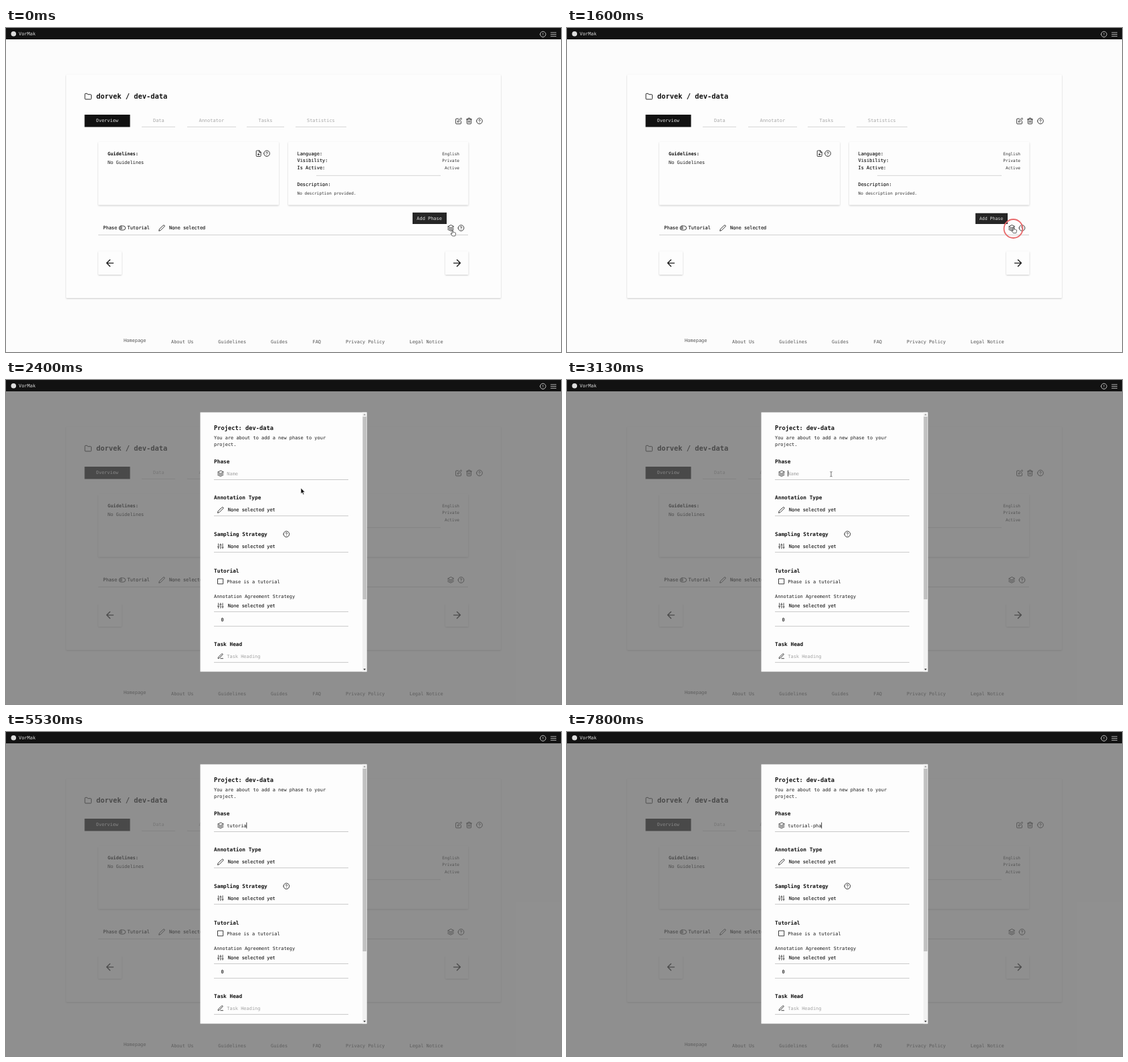
These frames come from a looping animation (830 px wide and 486 px high, 8000 ms). An HTML page:

```html
<!DOCTYPE html>
<html lang="en">
<head>
<meta charset="utf-8">
<title>Add phase</title>
<style>
html, body { margin: 0; width: 100%; height: 100%; overflow: hidden; background: #fcfcfc; }
svg { display: block; width: 830px; height: 486px; }
text { font-family: "DejaVu Sans Mono", "Liberation Mono", monospace; font-size: 6.94px; white-space: pre; }
.card { fill: #fdfdfd; filter: drop-shadow(0 1px 1px rgba(0, 0, 0, .2)); }
</style>
</head>
<body>
<svg id="stage" viewBox="0 0 830 486">
  <g id="page"></g>
  <g id="tip"></g>
  <g id="dialog"></g>
  <circle id="ring" fill="none" stroke="#e8696b" stroke-width="1.8"/>
  <g id="cursor">
    <path id="hand" fill="#fff" stroke="#222" stroke-width=".7" stroke-linejoin="round"
      d="M0 .8Q.8-.3 1.5.8V3.6L2.6 3.3 3.6 3.7 4.6 3.8 5.4 4.4V6.6L4.6 9H.6L-1.7 5.9Q-1.9 4.8-.8 5L0 5.8Z"/>
    <path id="arrow" fill="#111" stroke="#fff" stroke-width=".6" d="M0 0V8.6L2 6.8 3.4 10 4.8 9.4 3.4 6.3H6Z"/>
    <path id="beam" fill="none" stroke="#333" stroke-width=".7" d="M-1.6-3.6Q0-3.6 0-2.8 0-3.6 1.6-3.6M0-2.8V2.8M-1.6 3.6Q0 3.6 0 2.8 0 3.6 1.6 3.6"/>
  </g>
</svg>
<script>
const $ = id => document.getElementById(id);
const CIRCLE = 'M2 12a10 10 0 1 0 20 0a10 10 0 1 0-20 0';
const ICONS = {
  help: CIRCLE + 'M9.1 9a3 3 0 0 1 5.8 1c0 2-3 3-3 3M12 17h.01',
  info: CIRCLE + 'M12 8v4M12 16h.01',
  menu: 'M2 5h20M2 12h20M2 19h20',
  edit: 'M11 4H4a2 2 0 0 0-2 2v14a2 2 0 0 0 2 2h14a2 2 0 0 0 2-2v-7M18.5 2.5a2.1 2.1 0 0 1 3 3L12 15l-4 1 1-4z',
  trash: 'M3 6h18M19 6v14a2 2 0 0 1-2 2H7a2 2 0 0 1-2-2V6m3 0V4a2 2 0 0 1 2-2h4a2 2 0 0 1 2 2v2M10 11v6M14 11v6',
  layers: 'M12 2L2 7l10 5 10-5zM2 17l10 5 10-5M2 12l10 5 10-5',
  pencil: 'M17 3a2.8 2.8 0 1 1 4 4L7.5 20.5 2 22l1.5-5.5z',
  write: 'M12 20h9M16.5 3.5a2.1 2.1 0 0 1 3 3L7 19l-4 1 1-4z',
  sliders: 'M4 21v-7M4 10V3M12 21v-9M12 8V3M20 21v-5M20 12V3M1 14h6M9 8h6M17 16h6',
  folder: 'M22 19a2 2 0 0 1-2 2H4a2 2 0 0 1-2-2V5a2 2 0 0 1 2-2h5l2 3h9a2 2 0 0 1 2 2z',
  file: 'M14 2H6a2 2 0 0 0-2 2v16a2 2 0 0 0 2 2h12a2 2 0 0 0 2-2V8zM14 2v6h6M12 18v-6M9 15h6',
  left: 'M19 12H5M12 19l-7-7 7-7',
  right: 'M5 12h14M12 5l7 7-7 7',
  toggle: 'M8 5h8a7 7 0 0 1 0 14H8A7 7 0 0 1 8 5zM5 12a3 3 0 1 0 6 0a3 3 0 1 0-6 0',
  box: 'M3 3h18v18H3z'
};

const text = (x, y, s, fill = '#1c1c1c', more = '') => `<text x="${x}" y="${y}" fill="${fill}" ${more}>${s}</text>`;
const bold = (x, y, s, size = 6.94) => text(x, y, s, '#111', `font-weight="700" style="font-size:${size}px"`);
const small = (x, y, s, anchor = 'start') => text(x, y, s, '#333', `text-anchor="${anchor}" style="font-size:6.1px"`);
const medium = (x, y, s) => text(x, y, s, '#1c1c1c', 'stroke="#1c1c1c" stroke-width=".15"');
const rect = (x, y, w, h, fill, more = '') => `<rect x="${x}" y="${y}" width="${w}" height="${h}" fill="${fill}" ${more}/>`;
const card = (x, y, w, h) => rect(x, y, w, h, '#fdfdfd', 'class="card" rx="1"');
const rule = (x1, x2, y, color = '#cfcfcf') => `<path d="M${x1} ${y}H${x2}" stroke="${color}"/>`;
const icon = (name, x, y, size = 10.4, color = '#1c1c1c') =>
  `<path d="${ICONS[name]}" transform="translate(${x - size / 2} ${y - size / 2}) scale(${size / 24})"
    fill="none" stroke="${color}" stroke-width="2" stroke-linecap="round" stroke-linejoin="round"/>`;

const tabs = [[220, 'Data', 203, 253], [288.5, 'Annotator', 271, 344], [377.5, 'Tasks', 360, 416], [450, 'Statistics', 433, 509]];
const facts = [['Language:', 'English'], ['Visibility:', 'Private'], ['Is Active:', 'Active']];
const links = [[247, 'About Us'], [317.3, 'Guidelines'], [396, 'Guides'], [458.5, 'FAQ'], [508, 'Privacy Policy'], [603.5, 'Legal Notice']];

$('page').innerHTML = [
  rect(0, 0, 830, 486, '#fcfcfc'),
  card(90, 70, 650, 335),
  icon('folder', 122.8, 102.6, 11.5), bold(135, 106, 'dorvek / dev-data', 10.4),
  rect(117.5, 130, 68, 18.5, '#111'), text(134.6, 141.3, 'Overview', '#ddd'),
  ...tabs.map(([x, s, a, b]) => text(x, 141.3, s, '#a8a8a8') + rule(a, b, 148.3, '#d4d4d4')),
  icon('edit', 677, 139.5), icon('trash', 692.5, 139.5), icon('help', 708, 139.5),
  card(138, 171, 270, 94.5), card(422, 171, 269.5, 94.5),
  bold(152, 190.6, 'Guidelines:'), text(152, 204.4, 'No Guidelines'),
  icon('file', 377.7, 188.2), icon('help', 390, 188.2),
  ...facts.map(([k, v], i) => medium(435.5, 190.7 + i * 10.4, k) + small(678, 190.7 + i * 10.4, v, 'end')),
  rule(464, 650, 221.3, '#d4d4d4'),
  medium(435.5, 236.5, 'Description:'), small(435.5, 249.5, 'No description provided.'),
  medium(145.3, 302.4, 'Phase'), icon('toggle', 173.8, 300), medium(181.5, 302.4, 'Tutorial'),
  icon('pencil', 233, 300), medium(244, 302.4, 'None selected'),
  icon('layers', 665, 300), icon('help', 680.5, 300), rule(138, 691, 310.4),
  card(138, 335, 35, 35), card(657, 335, 34.5, 35),
  icon('left', 155.5, 352.6, 17), icon('right', 674.5, 352.6, 17),
  text(176, 471, 'Homepage', '#555'),
  ...links.map(([x, s]) => text(x, 472.6, s, '#555'))
].join('');

$('tip').innerHTML = rect(608, 276.8, 51, 17.2, '#262626') + text(614.3, 287.7, 'Add Phase', '#ddd');

const header = [
  rect(0, 0, 830, 17, '#121212'),
  '<circle cx="11.3" cy="8.8" r="3.8" fill="#ddd"/>',
  text(19, 11.2, 'VorMak', '#ddd'),
  icon('info', 803, 9.4, 10, '#ddd'), icon('menu', 818.7, 9.6, 9.4, '#ddd')
].join('');
$('tip').insertAdjacentHTML('beforebegin', `<g>${header}</g>`);

$('dialog').innerHTML = [
  rect(0, 17, 830, 469, 'rgba(98,98,98,.7)'),
  rect(290.5, 48.5, 249, 389, '#fdfdfd'),
  rect(533, 48.5, 6.5, 389, '#f1f1f1'), rect(533.5, 55, 5.5, 274, '#c1c1c1'),
  '<path d="M534.4 53L536.2 50.6 538 53z" fill="#a3a3a3"/><path d="M534.4 433L536.2 435.4 538 433z" fill="#444"/>',
  bold(311, 75, 'Project: dev-data', 8.7),
  text(311, 89, 'You are about to add a new phase to your'), text(311, 99.4, 'project.'),
  ...[[125, 'Phase'], [179.4, 'Annotation Type'], [234, 'Sampling Strategy'], [288.5, 'Tutorial'], [399.3, 'Task Head']]
    .map(([y, s]) => bold(311, y, s, 7.8)),
  ...[149.5, 203.8, 258.3, 347.6, 369.3, 423.6].map(y => rule(311, 512, y, '#c8c8c8')),
  icon('layers', 320.8, 140.3, 10), icon('pencil', 320.8, 195), icon('help', 419.3, 231.2),
  icon('sliders', 320.8, 249.3, 9.6), icon('box', 320.8, 302), icon('sliders', 320.8, 338.4, 9.6),
  icon('write', 320.8, 414.4, 10),
  ...[197.3, 251.8, 340.9].map(y => medium(331.8, y, 'None selected yet')),
  text(330.3, 304.5, 'Phase is a tutorial'), text(311, 327, 'Annotation Agreement Strategy'),
  medium(321.5, 362.4, '0'), text(330.3, 417, 'Task Heading', '#a3a3a3'),
  text(330.3, 142.8, '', '#1c1c1c', 'id="field"'),
  rect(0, 135.6, .8, 9, '#111', 'id="caret"')
].join('');

const LOOP = 8000, OPEN = 1730, WORD = 'tutorial-pha', ADVANCE = 4.178;
// time, letters typed, caret shown
const typing = [
  [0, 0, 0], [3000, 0, 1], [3530, 0, 0], [3800, 1, 1], [4060, 2, 1], [4130, 3, 1], [4730, 3, 0], [4930, 4, 1],
  [5130, 5, 1], [5330, 6, 1], [5530, 7, 1], [6130, 7, 0], [6260, 8, 1], [6860, 8, 0], [7000, 9, 1],
  [7400, 10, 1], [7660, 11, 1], [7800, 12, 1]
];
// time, x, y of the pointer's hot spot
const path = [
  [0, 667, 303], [200, 667, 303], [260, 667.2, 302.6], [460, 667.2, 302.6], [1060, 666.8, 299],
  [1730, 667, 298.6], [2400, 441, 162], [3060, 395, 141.2], [LOOP, 395, 141.2]
];
const clamp = v => Math.max(0, Math.min(1, v));
const smooth = v => v * v * (3 - 2 * v);
const show = (id, on) => { $(id).style.display = on ? '' : 'none'; };

function pointer(t) {
  const i = path.findIndex(p => p[0] > t);
  const [t0, x0, y0] = path[i - 1], [t1, x1, y1] = path[i];
  const k = smooth((t - t0) / (t1 - t0));
  return [x0 + (x1 - x0) * k, y0 + (y1 - y0) * k];
}

function draw(t) {
  const open = t >= OPEN;
  show('dialog', open);

  const scale = open ? 1 : 1 - .055 * smooth(clamp((t - 460) / 600));
  $('tip').setAttribute('transform', `translate(659 294) scale(${scale}) translate(-659 -294)`);
  show('tip', t < 2000);

  const fade = clamp((t - OPEN + 40) / 110);
  show('ring', t >= 1600 && t < 1840);
  $('ring').setAttribute('cx', 667.5 - fade * 2);
  $('ring').setAttribute('cy', 301);
  $('ring').setAttribute('r', open ? 5 - 2 * fade : 14);
  $('ring').setAttribute('opacity', open ? .6 * (1 - fade) : 1);

  const [x, y] = pointer(t);
  const inField = open && y < 149;
  $('cursor').setAttribute('transform', `translate(${x} ${y})`);
  show('cursor', t < 5130);
  show('hand', t < 1800);
  show('arrow', t >= 1800 && !inField);
  show('beam', inField);

  const [, count, caret] = typing.filter(s => s[0] <= t).pop();
  $('field').textContent = count ? WORD.slice(0, count) : 'Name';
  $('field').setAttribute('fill', count ? '#1c1c1c' : '#a3a3a3');
  $('caret').setAttribute('x', 330.2 + count * ADVANCE);
  show('caret', caret);
}

// Tooltip belongs to the page, below the dialog; it closes as the pointer leaves.
const start = performance.now();
function tick() {
  draw((performance.now() - start) % LOOP);
  requestAnimationFrame(tick);
}
tick();
</script>
</body>
</html>
```
